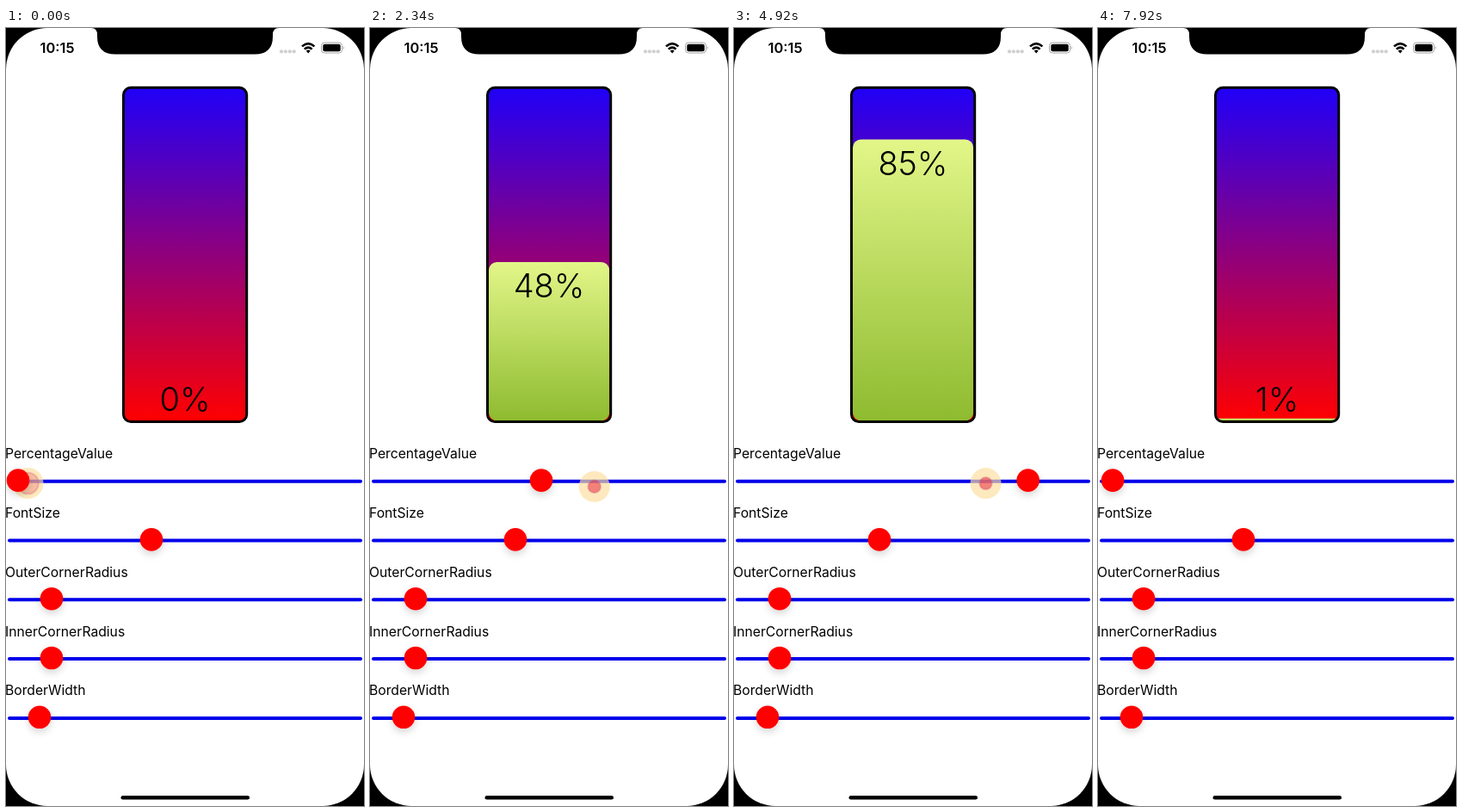
These frames come from a looping animation (416 px wide and 904 px high, 7980 ms). An HTML page:

```html
<!DOCTYPE html>
<html>
<head>
<meta charset="utf-8">
<style>
  html, body { margin: 0; width: 100%; height: 100%; overflow: hidden; background: #000; }
  svg { display: block; width: 100vw; height: 100vh; }
  .label { font: 15.7px Inter, Roboto, sans-serif; }
  .clock { font: 600 16.4px Inter, Roboto, sans-serif; }
  .percent { font: 350 38px Inter, "Liberation Sans", sans-serif; text-anchor: middle; }
  .thumb { fill: #f00; filter: url(#shadow); }
  .track { stroke: #0000ea; stroke-width: 4; stroke-linecap: round; }
</style>
</head>
<body>
<svg viewBox="0 0 416 904">
  <defs>
    <linearGradient id="bar" x2="0" y2="1">
      <stop stop-color="#2000f8"/><stop offset="1" stop-color="#ff0000"/>
    </linearGradient>
    <linearGradient id="level" x2="0" y2="1">
      <stop stop-color="#e2f688"/><stop offset="1" stop-color="#8ebb30"/>
    </linearGradient>
    <filter id="shadow" x="-60%" y="-60%" width="220%" height="240%">
      <feDropShadow dx="0" dy="4" stdDeviation="4" flood-color="#000" flood-opacity=".16"/>
    </filter>
  </defs>

  <rect width="416" height="904"/>
  <rect width="416" height="904" rx="48" fill="#fff"/>
  <path d="M99 0Q106 0 106 8V10Q106 30.5 127 30.5H289Q310 30.5 310 10V8Q310 0 317 0Z"/>
  <rect x="133.5" y="892" width="149.5" height="4.6" rx="2.3"/>

  <text class="clock" x="39.5" y="29">10:15</text>
  <g id="dots" fill="#cfcfcf"></g>
  <path d="M344 21.4Q351.2 14.8 358.4 21.4M346.8 24.6Q351.2 20.6 355.6 24.6"
    fill="none" stroke="#000" stroke-width="2.6"/>
  <path d="M348.7 26.6Q351.2 24.6 353.7 26.6L351.2 29.4Z"/>
  <rect x="366.5" y="17" width="24" height="12" rx="3.6" fill="#fff" stroke="#a5a5a5"/>
  <rect x="368.3" y="18.8" width="20.4" height="8.4" rx="2"/>
  <path d="M391.8 21Q394 23 391.8 25Z" fill="#a5a5a5"/>

  <rect x="136.5" y="69.3" width="143.2" height="388.2" rx="8.5" fill="url(#bar)"/>
  <rect id="fill" x="138" width="140.2" fill="url(#level)"/>
  <rect x="136.5" y="69.3" width="143.2" height="388.2" rx="8.5" fill="none" stroke="#000" stroke-width="3"/>
  <text id="percent" class="percent" x="208"></text>

  <g id="tracks"></g>
  <g id="touch">
    <circle r="18" fill="#fcdf9e" fill-opacity=".68"/>
    <circle id="pulse" fill="#e8243c" stroke="#d05078" stroke-width="2" stroke-opacity=".28"/>
  </g>
  <g id="thumbs"></g>
</svg>
<script>
const LOOP = 7980, STEP = 60, LAG = 480, RELEASE = 7500, PULSE = 862, SWAY = 3270;
const byId = id => document.getElementById(id);
const clamp = (v, min, max) => Math.max(min, Math.min(max, v));

function set(node, attrs) {
  for (const name in attrs) node.setAttribute(name, attrs[name]);
}

function add(parent, tag, attrs, text = '') {
  const node = document.createElementNS('http://www.w3.org/2000/svg', tag);
  set(node, attrs);
  node.textContent = text;
  return byId(parent).appendChild(node);
}

// The finger's drag in percent of the slider; the thumb follows it LAG ms later.
const drag = [[-LAG, 0], [0, 3], [540, 12], [1860, 48], [3300, 96],
  [3800, 114], [4440, 85], [6060, 42], [6540, 18], [7440, 0.8]];

function finger(t) {
  const i = drag.findIndex(([time]) => time > t);
  if (i < 0) return drag[drag.length - 1][1];
  const [t0, a] = drag[i - 1], [t1, b] = drag[i];
  return a + (b - a) * (t - t0) / (t1 - t0);
}

const sliderX = percent => 14 + 3.855 * percent;

for (let i = 0; i < 4; i++) add('dots', 'circle', { cx: 320 + i * 4.9, cy: 27.3, r: 2.1 });

const sliders = { PercentageValue: 14, FontSize: 169, OuterCornerRadius: 53, InnerCornerRadius: 53, BorderWidth: 39 };
const [thumb] = Object.entries(sliders).map(([name, x], i) => {
  const y = 526.7 + i * 68.8;
  add('tracks', 'text', { class: 'label', x: -1, y: y - 26.5 }, name);
  add('tracks', 'path', { class: 'track', d: `M4 ${y}H412` });
  return add('thumbs', 'circle', { class: 'thumb', cx: x, cy: y - 1.1, r: 13.3 });
});

function draw(t) {
  const value = clamp(finger(t - LAG), 0, 100);
  const top = 456.8 - 3.85 * value;
  const height = Math.max(0, 456.3 - top);
  set(byId('fill'), { y: top, height, rx: Math.min(9.5, height / 2) });
  set(byId('percent'), { y: Math.min(445, top + 41) });
  byId('percent').textContent = Math.round(value) + '%';
  set(thumb, { cx: sliderX(value) });

  const y = 529 - 4 * Math.sin(2 * Math.PI * t / SWAY);
  set(byId('touch'), {
    transform: `translate(${sliderX(finger(t))} ${y})`,
    visibility: t < RELEASE ? 'visible' : 'hidden'
  });
  const phase = (t / PULSE + 0.705) % 1;
  set(byId('pulse'), { r: 17.5 * phase, 'fill-opacity': 0.52 * clamp((0.85 - phase) / 0.35, 0, 1) });
}

const start = performance.now();
function frame() {
  const t = (performance.now() - start) % LOOP;
  draw(Math.floor(t / STEP) * STEP);
  requestAnimationFrame(frame);
}
frame();
</script>
</body>
</html>
```
